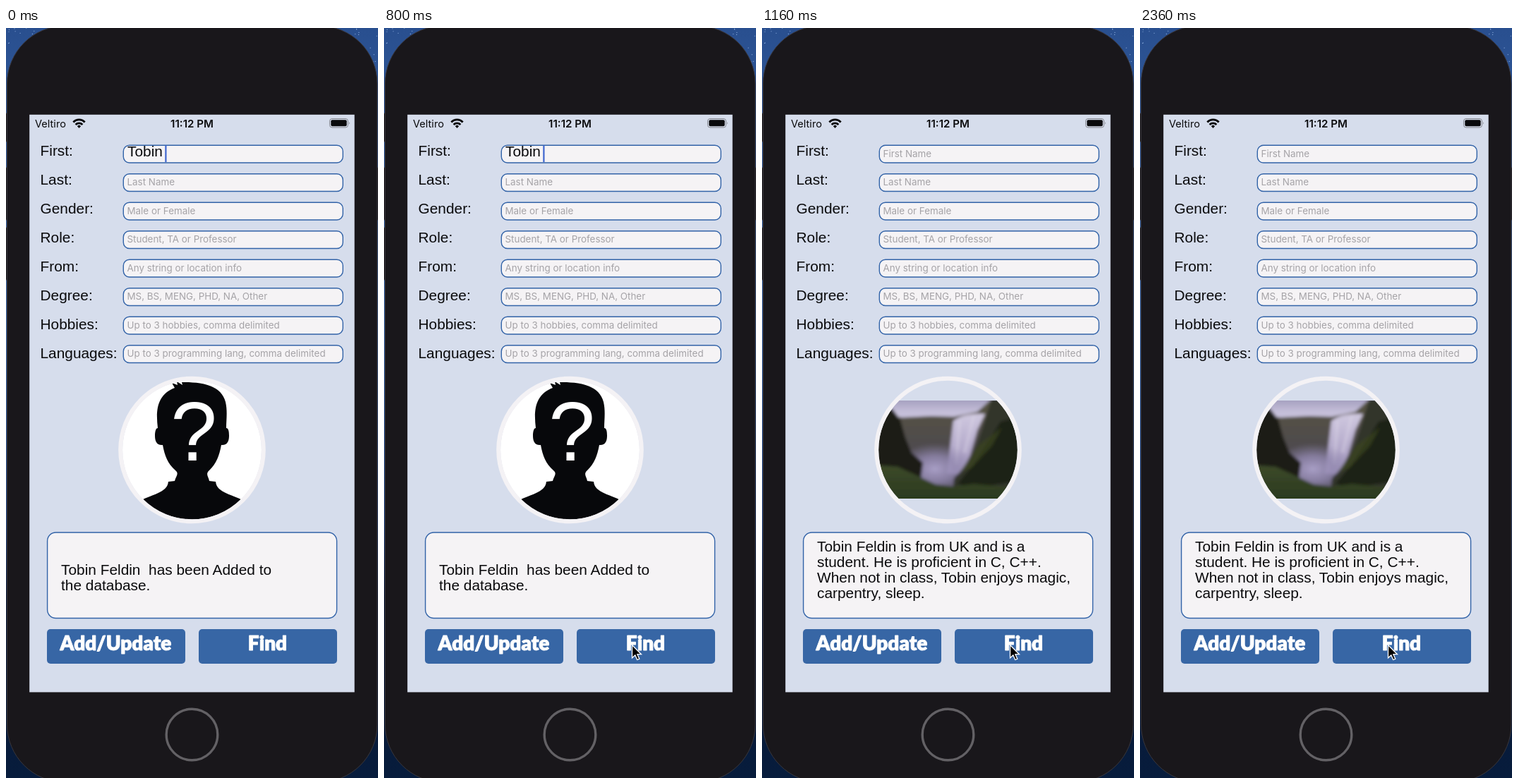
Animation, 527 px wide and 1063 px high, one loop 2.4 s. Source, as an HTML page:

```html
<!DOCTYPE html>
<html lang="en">
<head>
<meta charset="utf-8">
<title>Student lookup</title>
<style>
  html, body { margin: 0; width: 100%; height: 100%; overflow: hidden; background: #19171b; }
  svg { display: block; width: 527px; height: 1063px; }
  text { white-space: pre; }
  .label { font: 20.86px "Liberation Sans", Arial, sans-serif; fill: #0a0a0c; }
  .hint { font: 13.4px Inter, sans-serif; fill: #a5a3a7; }
  .status { font: 14.6px Inter, sans-serif; fill: #0a0a0c; }
  .clock { font-weight: 600; font-size: 15.1px; text-anchor: middle; }
  .button { font: 900 28px Lato, sans-serif; fill: #fff; text-anchor: middle;
    stroke: #fff; stroke-width: .9; stroke-linejoin: round; }
  .mark { font: 118px "Liberation Sans", Arial, sans-serif; fill: #fff; text-anchor: middle; }
  .box { fill: #f5f3f5; stroke: #3263a8; stroke-width: 1.4; }
</style>
</head>
<body>
<svg viewBox="0 0 527 1063">
  <defs>
    <linearGradient id="night" x2="0" y2="1">
      <stop offset="0" stop-color="#294f8f"/>
      <stop offset=".4" stop-color="#3e6cae"/>
      <stop offset=".66" stop-color="#234684"/>
      <stop offset=".76" stop-color="#0a1836"/>
      <stop offset="1" stop-color="#071c3c"/>
    </linearGradient>
    <linearGradient id="sky" x2="0" y2="1">
      <stop offset="0" stop-color="#8f8aad"/>
      <stop offset=".18" stop-color="#c6c0da"/>
    </linearGradient>
    <linearGradient id="hill" x2="0" y2="1">
      <stop offset="0" stop-color="#55533f"/>
      <stop offset=".7" stop-color="#4c4757"/>
    </linearGradient>
    <linearGradient id="fall" x2="0" y2="1">
      <stop offset="0" stop-color="#cfc8df"/>
      <stop offset="1" stop-color="#a094bc"/>
    </linearGradient>
    <linearGradient id="grass" x2="0" y2="1">
      <stop offset="0" stop-color="#3d4a2a"/>
      <stop offset="1" stop-color="#26361c"/>
    </linearGradient>
    <radialGradient id="mist">
      <stop offset="0" stop-color="#a99fc6"/>
      <stop offset=".5" stop-color="#9389b0" stop-opacity=".8"/>
      <stop offset="1" stop-color="#8d84a8" stop-opacity="0"/>
    </radialGradient>
    <filter id="soft"><feGaussianBlur stdDeviation="2.2"/></filter>
    <clipPath id="disc"><circle cx="263.5" cy="598" r="98.5"/></clipPath>
    <clipPath id="frame"><path d="M165 528h197v139H165z"/></clipPath>
  </defs>

  <rect width="527" height="1063" fill="url(#night)"/>
  <g id="stars" fill="#8fb0e0"></g>
  <g fill="#19171b" stroke="#38363c">
    <path d="M-2 121H2V161H-2ZM-2 198H2V272H-2ZM-2 283H2V357H-2ZM525 198H529V272H525Z"/>
    <rect x="1.5" y="-3" width="524.5" height="1072" rx="82"/>
  </g>
  <circle cx="263.5" cy="1001.5" r="36.3" fill="none" stroke="#636165" stroke-width="3.4"/>
  <rect x="33.2" y="122.8" width="460.5" height="818.6" fill="#d6ddec"/>

  <text class="status" x="41" y="140.5">Veltiro</text>
  <text class="status clock" x="263.5" y="140.5">11:12 PM</text>
  <g fill="none" stroke="#0a0a0c" stroke-width="2.8">
    <path d="M95.3 133.4a11.5 11.5 0 0 1 16.4 0M98.6 136.9a7 7 0 0 1 9.8 0"/>
    <path d="M103.5 142l-2.6-2.8a3.6 3.6 0 0 1 5.2 0z" fill="#0a0a0c" stroke="none"/>
  </g>
  <rect x="458.5" y="128.5" width="26" height="12.5" rx="3.5" fill="none" stroke="#85878f"/>
  <rect x="460.3" y="130.3" width="22.4" height="8.9" rx="2" fill="#0a0a0c"/>
  <path d="M486 132.8q1.6 2 0 4z" fill="#85878f"/>

  <g id="form"></g>

  <g id="before">
    <text class="label" x="172" y="181.7">Tobin</text>
    <rect id="caret" x="225.3" y="166.5" width="2.2" height="23.5" fill="#3f66cf"/>
    <g clip-path="url(#disc)">
      <rect x="160" y="490" width="207" height="210" fill="#fff"/>
      <path fill="#07080b" d="M185 673C206 660 228 660 230 643L239 642C240 636 246 632 240 627
        C229 617 225 607 222 591C214 592 211 586 211 578C211 570 213 567 215 567
        C212 541 214 520 239 510L235 503L243 506L242 501L250 506L249 502
        C270 502 304 503 311 530C314 543 312 556 312 567C315 567 316 571 316 578
        C316 586 313 592 305 591C302 607 298 617 288 627C282 632 287 636 288 642
        L297 643C299 660 321 660 342 673V700H185Z"/>
      <text class="mark" x="266" y="613">?</text>
    </g>
    <text class="label" x="78" y="775">Tobin Feldin  has been Added to</text>
    <text class="label" x="78" y="797">the database.</text>
  </g>

  <g id="after">
    <text class="hint" x="171.5" y="182.6">First Name</text>
    <g clip-path="url(#disc)"><g clip-path="url(#frame)"><g filter="url(#soft)">
      <rect x="150" y="515" width="227" height="165" fill="url(#sky)"/>
      <path fill="url(#hill)" d="M150 548L200 552 240 550 272 551 305 544 326 525H377V680H150Z"/>
      <path fill="url(#fall)" d="M271 557Q286 545 316 547L305 570 295 605 282 632 262 632Z"/>
      <path stroke="#e2dcec" stroke-width="4" opacity=".4" d="M280 556L275 618M300 550L287 602"/>
      <ellipse cx="245" cy="625" rx="58" ry="36" fill="url(#mist)"/>
      <path fill="#1d1f16" d="M150 550L183 538 196 555 203 580 212 602 228 616 225 640 150 640Z"/>
      <path fill="#33362a" d="M325 525H377V680H268L272 638 291 618 304 590 314 562Z"/>
      <path fill="#1b2013" d="M338 558L377 548V640L300 652 277 646 300 618Z"/>
      <path fill="#3d4623" d="M306 592L340 566 326 592 296 624 280 630Z" opacity=".7"/>
      <path fill="url(#grass)" d="M150 619L192 622 221 635 246 647 272 650 300 646 377 654V680H150Z"/>
    </g></g></g>
    <g id="bio"></g>
  </g>
  <circle cx="263.5" cy="598" r="101.3" fill="none" stroke="#f4f2f5" stroke-width="6"/>

  <g fill="#3766a5">
    <rect x="58" y="852" width="196" height="49" rx="5"/>
    <rect x="273" y="852" width="196" height="49" rx="5"/>
  </g>
  <text class="button" x="155.5" y="882">Add/Update</text>
  <text class="button" x="370.5" y="882">Find</text>
  <path id="pointer" d="M0 0V18.3L4.3 14.4 7.2 21 10.3 19.7 7.4 13.2H13Z" fill="#000" stroke="#fff" stroke-width="1.3"/>
</svg>

<script>
const $ = id => document.getElementById(id);
const text = (cls, x, y, words) => `<text class="${cls}" x="${x}" y="${y}">${words}</text>`;
const box = (x, y, w, h, r) => `<rect class="box" x="${x}" y="${y}" width="${w}" height="${h}" rx="${r}"/>`;
const clamp = v => Math.min(1, Math.max(0, v));
const random = seed => (Math.abs(Math.sin(seed) * 43758.5)) % 1;

const fields = [
  ["First:", ""],
  ["Last:", "Last Name"],
  ["Gender:", "Male or Female"],
  ["Role:", "Student, TA or Professor"],
  ["From:", "Any string or location info"],
  ["Degree:", "MS, BS, MENG, PHD, NA, Other"],
  ["Hobbies:", "Up to 3 hobbies, comma delimited"],
  ["Languages:", "Up to 3 programming lang, comma delimited"]
];
$("form").innerHTML = fields.map(([label, hint], i) =>
  text("label", 48.5, 181.2 + 40.95 * i, label) +
  box(166.3, 166.3 + 40.5 * i, 311, 24.7, 8.5) +
  text("hint", 171.5, 182.6 + 40.5 * i, hint)
).join("") + box(58.6, 715, 410, 121.5, 12);

$("bio").innerHTML = [
  "Tobin Feldin is from UK and is a",
  "student. He is proficient in C, C++.",
  "When not in class, Tobin enjoys magic,",
  "carpentry, sleep."
].map((line, i) => text("label", 78, 742 + 22 * i, line)).join("");

// Faint stars in the two upper corners
$("stars").innerHTML = Array.from({ length: 50 }, (_, i) => {
  const x = 50 * random(i + 1), y = 50 * random(i + 99);
  return `<circle cx="${i % 2 ? 527 - x : x}" cy="${y}" r=".6"/>`;
}).join("");

const LOOP = 2400, FOUND = 840, ARRIVE = 560;

function draw(now) {
  const t = now % LOOP;
  $("before").style.display = t < FOUND ? "" : "none";
  $("after").style.display = t < FOUND ? "none" : "";
  $("caret").setAttribute("opacity", clamp((240 - t) / 120) + clamp((t - 560) / 120));
  const left = Math.pow(1 - clamp(t / ARRIVE), 3.25);
  $("pointer").setAttribute("transform", `translate(${351.5 + 180 * left} ${874.5 + 222 * left})`);
  requestAnimationFrame(draw);
}
requestAnimationFrame(draw);
</script>
</body>
</html>
```
